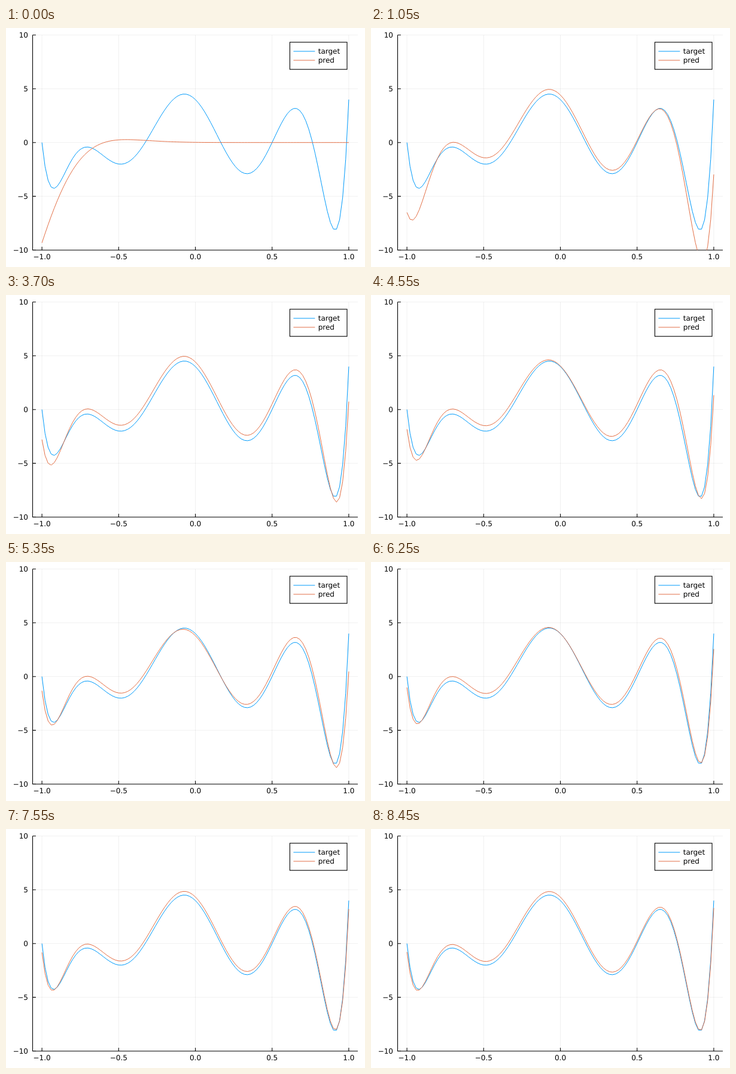
These frames come from a looping animation (600x400 px, 8500 ms). An HTML page:

```html
<!DOCTYPE html>
<html lang="en">
<head>
<meta charset="utf-8">
<title>Curve fitting</title>
<style>
  html, body { margin: 0; width: 100%; height: 100%; overflow: hidden; background: #fff; }
  svg { display: block; }
  text { font: 12px "DejaVu Sans", sans-serif; fill: #000; text-rendering: geometricPrecision; }
  path, rect { fill: none; stroke-width: 1; }
  .grid { stroke: #000; stroke-opacity: .1; stroke-width: .6; }
  .axis { stroke: #000; stroke-width: 1.1; }
  .target { stroke: #009afa; }
  .pred { stroke: #e26f46; }
</style>
</head>
<body>
<svg width="600" height="400" viewBox="0 0 600 400">
  <clipPath id="area"><rect x="44.5" y="11.8" width="543.5" height="360"/></clipPath>
  <g id="frame"></g>
  <g clip-path="url(#area)">
    <path id="target" class="target"/>
    <path id="pred" class="pred"/>
  </g>
  <rect x="474.4" y="23.8" width="95.6" height="45.4" style="fill:#fff" class="axis"/>
  <path class="target" d="M480.4 39H516.4"/>
  <path class="pred" d="M480.4 54H516.4"/>
  <text x="521.7" y="43.4">target</text>
  <text x="521.7" y="58.4">pred</text>
</svg>
<script>
const LOOP = 8500, STEP = 50;
const SETTLE = 2250, END = 8450;
const px = x => 316.5 + 256.4 * x;
const py = y => 191.7 - 17.99 * y;
const bell = (x, mid, width) => Math.exp(-(((x - mid) / width) ** 2));
const $ = id => document.getElementById(id);

// Axes, ticks and labels
const label = v => String(v).replace("-", "\u2212");
let grid = "", ticks = "M44.5 11.8V371.7H588", texts = "";
for (let i = -2; i <= 2; i++) {
  const x = px(i / 2), y = py(i * 5);
  grid += `M${x} 11.8V371.7M44.5 ${y}H588`;
  ticks += `M${x} 371.7v-5.4M44.5 ${y}h5.4`;
  texts += `<text x="${x}" y="387" text-anchor="middle">${label((i / 2).toFixed(1))}</text>`
    + `<text x="37" y="${y + 4.4}" text-anchor="end">${label(i * 5)}</text>`;
}
$("frame").innerHTML = `<path class="grid" d="${grid}"/><path class="axis" d="${ticks}"/>${texts}`;

// Target: a short Chebyshev series
function target(x) {
  const a = Math.acos(x), T = n => Math.cos(n * a);
  return -1 - 2 * T(2) + T(4) + T(6) + 2 * T(7) + 3 * T(8);
}

// First guess: steep on the left, then flat
function start(x) {
  const u = x + 1;
  return -9.33 * (1 - u / .405) * Math.exp(-u * (2.2 + 4.3 * u));
}

// Remaining misfit: a sloping offset, a dip in the middle and two decaying ends
function misfit(t) {
  const age = Math.max(0, t - SETTLE), k = age / (END - SETTLE);
  const swell = Math.sin(Math.PI * Math.sqrt(k));
  const dip = bell(t, 5350, 1350);
  const left = .62 - .26 * k, right = .2 + .32 * swell;
  const leftEnd = 1.05 + 6.05 * Math.exp(-age / 1500);
  const fade = Math.exp(-age / 2000);
  const rightEnd = .6 + 6.6 * fade + 2 * dip ** 4;
  const reach = .045 + .055 * fade;
  return x => {
    const mix = Math.min(1, Math.max(0, (x + .6) / 1.2));
    return left + (right - left) * mix
      - (.72 * dip - .05) * bell(x, .02, .26)
      + .45 * swell ** 2 * bell(x, .82, .1)
      - leftEnd * Math.exp(-(1 + x) / .08)
      - rightEnd * Math.exp(-(1 - x) / reach);
  };
}

function predAt(t) {
  const error = misfit(t);
  const rest = Math.exp(-t / 220);
  const u = t / 150, kick = 14 * u * u * Math.exp(2 - 2 * u);
  return x => {
    const fit = target(x) + error(x);
    return fit + (start(x) - fit) * rest + kick * Math.exp((x - 1) / .08);
  };
}

function trace(f) {
  let d = "";
  for (let i = 0; i <= 100; i++) {
    const x = (i - 50) / 50;
    d += (i ? "L" : "M") + px(x).toFixed(2) + " " + py(f(x)).toFixed(2);
  }
  return d;
}

$("target").setAttribute("d", trace(target));

const begin = performance.now();
let shown = -1;
function draw() {
  const step = Math.floor(((performance.now() - begin) % LOOP) / STEP);
  if (step !== shown) {
    shown = step;
    $("pred").setAttribute("d", trace(predAt(step * STEP)));
  }
  requestAnimationFrame(draw);
}
draw();
</script>
</body>
</html>
```
